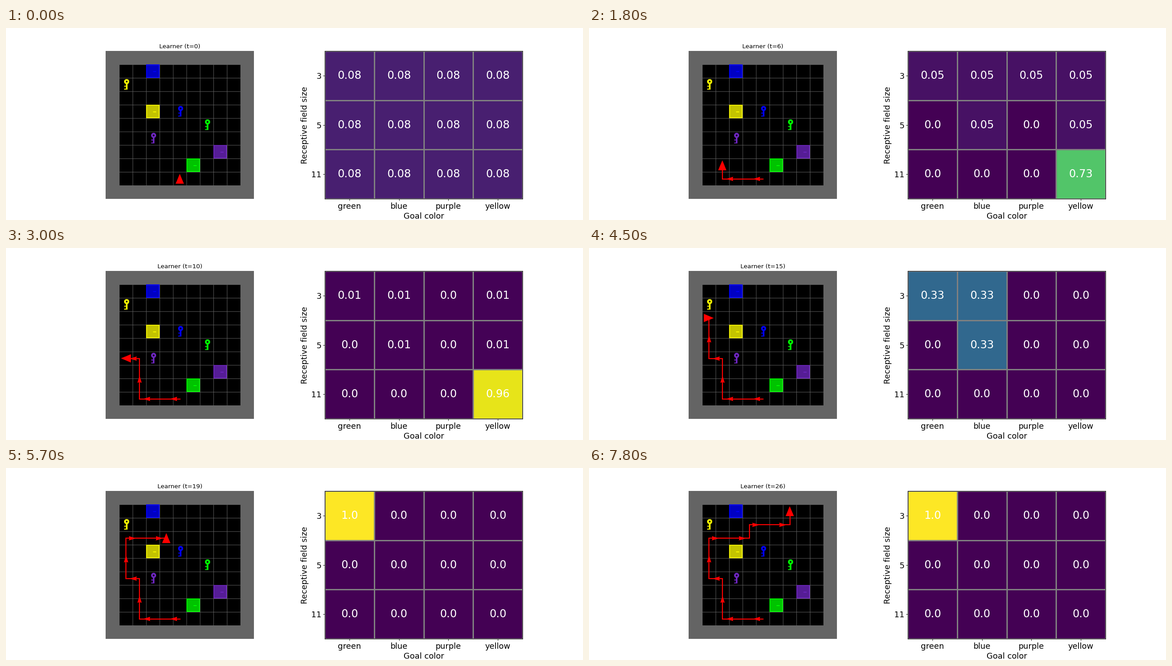
Recreate the animation shown at these times as a matplotlib script. Size 1280 px wide and 427 px high, loop 8000 ms.

```python
import numpy as np
import matplotlib.pyplot as plt
from matplotlib.animation import FuncAnimation

DPI = 80
FRAMES, INTERVAL, FRAMES_PER_STEP = 80, 100, 3
TILE, SUB, CELLS = 32, 3, 11
GREY = (100, 100, 100)
RED = (255, 0, 0)
COLORS = {"green": (0, 255, 0), "blue": (0, 0, 255),
          "purple": (112, 39, 195), "yellow": (255, 255, 0)}
FIELD_SIZES = (3, 5, 11)

# Tile positions (column, row), counted with the surrounding wall
KEYS = {"green": (7, 5), "blue": (5, 4), "purple": (3, 6), "yellow": (1, 2)}
DOORS = {"green": (6, 8), "blue": (3, 1), "purple": (8, 7), "yellow": (3, 4)}
START = (5, 9)
ACTIONS = "LFFFRFFFLFRFFFRFFFLFRFFFLF"  # L/R turn, F forward

# Evidence per step: (step, factor, hypotheses as (field row, color column))
EVIDENCE = [
    (1, 0, [(1, 0), (2, 0), (2, 1)]),
    (1, 2, [(1, 2), (2, 2), (2, 3)]),
    (3, 2, [(1, 2), (2, 2), (2, 3)]),
    (4, 0, [(1, 2), (2, 2)]),
    (8, 2, [(0, 2)]),
    (9, 0, [(0, 2)]),
    (15, 0, [(0, 3), (1, 3), (2, 3)]),
    (17, 2, [(1, 1)]),
    (18, 2, [(1, 1)]),
    (19, 0, [(0, 1), (1, 1)]),
]
EVIDENCE += [(step, 2, [(2, 3)]) for step in (4, 5, 7, 8, 9)]
EVIDENCE += [(step, 4, [(2, 3)]) for step in (11, 13, 14)]

axis = (np.arange(TILE * SUB) + 0.5) / (TILE * SUB)
X, Y = np.meshgrid(axis, axis)


def rect(x0, x1, y0, y1):
    return (X >= x0) & (X <= x1) & (Y >= y0) & (Y <= y1)


def circle(cx, cy, r):
    return (X - cx) ** 2 + (Y - cy) ** 2 <= r ** 2


def triangle(heading):
    dx, dy = heading
    along = (X - 0.5) * dx + (Y - 0.5) * dy
    across = (Y - 0.5) * dx - (X - 0.5) * dy
    return (along >= -0.38) & (np.abs(across) <= 0.31 * (0.37 - along) / 0.75)


def tile(*layers):
    """Paint (mask, color) layers on an empty floor tile and smooth it."""
    img = np.zeros((TILE * SUB, TILE * SUB, 3))
    img[rect(0, 0.031, 0, 1) | rect(0, 1, 0, 0.031)] = GREY
    for mask, color in layers:
        img[mask] = color
    return img.reshape(TILE, SUB, TILE, SUB, 3).mean(axis=(1, 3)).astype(np.uint8)


def key_tile(color):
    shape = (rect(0.50, 0.63, 0.31, 0.88) | rect(0.38, 0.50, 0.59, 0.66)
             | rect(0.38, 0.50, 0.81, 0.88) | circle(0.56, 0.28, 0.19))
    return tile((shape, color), (circle(0.56, 0.28, 0.064), (0, 0, 0)))


def door_tile(color):
    inner = 0.765 * np.array(color)
    return tile((rect(0, 1, 0, 1), color),
                (rect(0.06, 0.94, 0.06, 0.94), inner),
                (rect(0.52, 0.75, 0.50, 0.56), color))


def put(img, pos, part):
    x, y = pos[0] * TILE, pos[1] * TILE
    img[y:y + TILE, x:x + TILE] = part


def make_room():
    img = np.full((CELLS * TILE, CELLS * TILE, 3), 100, np.uint8)
    floor = tile()
    for row in range(1, CELLS - 1):
        for col in range(1, CELLS - 1):
            put(img, (col, row), floor)
    for name, color in COLORS.items():
        put(img, KEYS[name], key_tile(color))
        put(img, DOORS[name], door_tile(color))
    return img


def walk(step):
    """Visited positions and heading after the given number of actions."""
    path, (dx, dy) = [START], (0, -1)
    for action in ACTIONS[:step]:
        if action == "L":
            dx, dy = dy, -dx
        elif action == "R":
            dx, dy = -dy, dx
        else:
            path.append((path[-1][0] + dx, path[-1][1] + dy))
    return path, (dx, dy)


def belief(step):
    weights = np.ones((len(FIELD_SIZES), len(COLORS)))
    for when, factor, cells in EVIDENCE:
        if when <= step:
            for cell in cells:
                weights[cell] *= factor
    return weights / weights.sum()


def centers(path):
    return (np.array(path) + 0.5) * TILE


def arrow_head(start, end):
    forward = (end - start) / TILE
    side = np.array([-forward[1], forward[0]])
    outline = [(7.5, 0), (-9.6, 5.2), (-7.9, 0), (-9.6, -5.2)]
    return np.array([(start + end) / 2 + a * forward + b * side for a, b in outline])


plt.rcParams["font.family"] = "DejaVu Sans"
fig, (room_ax, heat_ax) = plt.subplots(1, 2, figsize=(16, 427 / DPI), dpi=DPI)

room = make_room()
room_image = room_ax.imshow(room)
room_ax.autoscale(False)
room_ax.axis("off")
title = room_ax.set_title("", fontsize=12)
trail, = room_ax.plot([], [], color="red", lw=2, solid_capstyle="projecting",
                      solid_joinstyle="miter")

# Every second move carries an arrow head
route = centers(walk(len(ACTIONS))[0])
heads = [(i + 1, room_ax.fill(*arrow_head(route[i], route[i + 1]).T,
                              color="red", lw=0, zorder=3)[0])
         for i in range(0, len(route) - 1, 2)]

heat = heat_ax.pcolormesh(belief(0), cmap="viridis", vmin=0, vmax=1,
                          edgecolors="gray", linewidth=1)
heat_ax.set_aspect("equal")
heat_ax.invert_yaxis()
heat_ax.set_xticks(np.arange(len(COLORS)) + 0.5, list(COLORS), fontsize=16)
heat_ax.set_yticks(np.arange(len(FIELD_SIZES)) + 0.5, FIELD_SIZES, fontsize=16)
heat_ax.set_xlabel("Goal color", fontsize=16)
heat_ax.set_ylabel("Receptive field size", fontsize=16)
labels = [heat_ax.text(col + 0.5, row + 0.5, "", color="white", fontsize=21.5,
                       ha="center", va="center")
          for row in range(len(FIELD_SIZES)) for col in range(len(COLORS))]


def update(frame):
    step = min(frame // FRAMES_PER_STEP, len(ACTIONS))
    path, heading = walk(step)

    img = room.copy()
    put(img, path[-1], tile((triangle(heading), RED)))
    room_image.set_data(img)
    title.set_text(f"Learner (t={step})")

    points = centers(path) if len(path) > 1 else np.empty((0, 2))
    trail.set_data(points[:, 0], points[:, 1])
    for move, head in heads:
        head.set_visible(move < len(path))

    probs = belief(step)
    heat.set_array(probs)
    for label, p in zip(labels, probs.flat):
        label.set_text(str(round(float(p), 2)))
    return []


anim = FuncAnimation(fig, update, frames=FRAMES, interval=INTERVAL,
                     init_func=lambda: update(0), repeat=True, repeat_delay=0)
plt.show()
```
